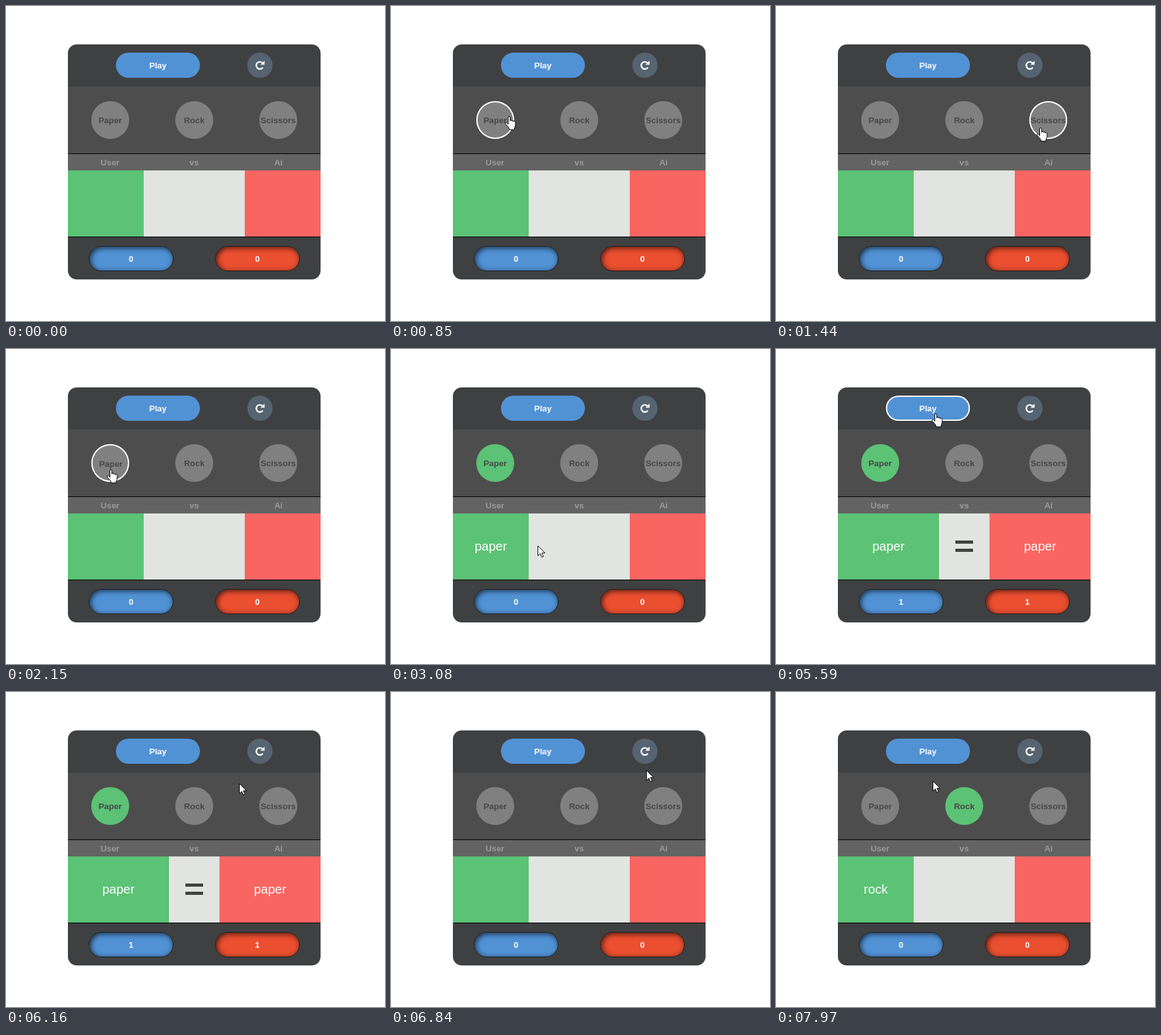
Animation, 600 px wide and 500 px high, one loop 8000 ms. Source, as an HTML page:

```html
<!DOCTYPE html>
<html lang="en">
<head>
<meta charset="utf-8">
<title>Paper Rock Scissors</title>
<style>
html, body { margin: 0; width: 100%; height: 100%; overflow: hidden; background: #fff; }
body { position: relative; font: bold 13.333px "Liberation Sans", Arial, sans-serif; }
div { box-sizing: border-box; }
.card { position: absolute; left: 98px; top: 61px; width: 400px; height: 373px; border-radius: 14px; overflow: hidden; background: #3f4042; }
.card div, .card svg { position: absolute; }
.btn, .score, .label, .side { display: flex; align-items: center; justify-content: center; }
.choices { top: 67px; width: 400px; height: 106px; background: #4d4d4d; }
.labels { top: 173px; width: 400px; height: 27px; border-top: 1px solid #000; background: #636363; color: #9a9a9a; }
.label { top: 0; width: 33.333%; height: 26px; }
.arena { top: 200px; width: 400px; height: 106px; border-bottom: 1px solid #000; background: #e1e4e1; }
.side { top: 0; width: 120px; height: 105px; color: #fff; font-size: 20px; font-weight: normal; }
.side.wide { width: 160px; }
#user { left: 0; background: #5cc275; }
#ai { right: 0; background: #f96561; }
#equal { left: 186px; top: 43px; width: 28px; height: 18px; border: solid #424242; border-width: 5px 0; visibility: hidden; }
.btn { border-radius: 30px; }
.btn.over { box-shadow: inset 0 0 0 2px #fff; }
.btn.down > * { transform: translate(1px, 1px); }
.pick { top: 90px; width: 60px; height: 60px; background: #808080; color: #474747; }
.pick.on { background: #5cc275; }
#play { left: 76px; top: 13px; width: 133px; height: 40px; background: #5192d5; color: #fff; }
#reset { left: 284px; top: 13px; width: 40px; height: 40px; background: #566370; }
#paper { left: 37px; }
#rock { left: 170px; }
#scissors { left: 303px; }
.score { top: 320px; width: 134px; height: 40px; border: 1px solid #1b1b1b; border-radius: 20px; color: #fff; box-shadow: inset 2px 2px 8px rgba(0, 0, 0, .7); }
#userScore { left: 33px; background: #5192d5; }
#aiScore { left: 233px; background: #ea4f30; }
#cursor { position: absolute; left: 0; top: 0; overflow: visible; visibility: hidden; }
#cursor path { fill: #fff; stroke: #000; stroke-linejoin: round; }
</style>
</head>
<body>
<div class="card">
  <div class="choices"></div>
  <div class="btn" id="play"><span>Play</span></div>
  <div class="btn" id="reset">
    <svg width="16" height="16" viewBox="0 0 16 16">
      <path d="M12.2 4.6A5.7 5.7 0 1 0 12.6 11.6" fill="none" stroke="#fff" stroke-width="2.4"/>
      <path d="M15.3 .8V7.2H8.9z" fill="#fff"/>
    </svg>
  </div>
  <div class="btn pick" id="paper"><span>Paper</span></div>
  <div class="btn pick" id="rock"><span>Rock</span></div>
  <div class="btn pick" id="scissors"><span>Scissors</span></div>
  <div class="labels">
    <div class="label" style="left:0">User</div>
    <div class="label" style="left:33.333%">vs</div>
    <div class="label" style="right:0">Ai</div>
  </div>
  <div class="arena">
    <div class="side" id="user"></div>
    <div id="equal"></div>
    <div class="side" id="ai"></div>
  </div>
  <div class="score" id="userScore">0</div>
  <div class="score" id="aiScore">0</div>
</div>
<svg id="cursor" width="20" height="24">
  <path id="arrow" d="M.5 .5V16.2L4.2 12.7L6.7 18.4L9.2 17.3L6.8 11.8H11.8z"/>
  <path id="hand" transform="translate(-6 0)" d="M5.5 12.7V2a1.5 1.5 0 0 1 3 0V7.5q0-1.5 1.5-1.5t1.5 1.5V8q0-1.2 1.4-1.2t1.4 1.2V9q0-1.2 1.3-1.2t1.4 1.4V14q0 2-1 3.5-.8 1.2-.8 4H7.5q0-2-1.5-4L1.5 12.5q-1-1.5 0-2.2 1.2-.7 2.4 .8z"/>
</svg>
<script>
const LOOP = 8000, PRESS = 100;
const $ = id => document.getElementById(id);

// Each button as a pill: centre, half length of its straight part, radius.
const buttons = [...document.querySelectorAll(".btn")].map(el => {
  const { left, top, width, height } = el.getBoundingClientRect();
  return { el, x: left + width / 2, y: top + height / 2, half: (width - height) / 2, r: height / 2 };
});
const on = Object.fromEntries(buttons.map(b => [b.el.id, [b.x, b.y + 10]]));

// Pointer glides; the pointer rests between them.
const glides = [
  { from: 360, to: 1160, via: [[205, 428], on.paper, on.rock] },
  { from: 1290, to: 2040, via: [on.rock, [418, 193], on.scissors, on.scissors, on.rock, on.paper] },
  { from: 2660, to: 4120, via: [on.paper, [190, 240], [232, 311], [262, 376], [268, 378], [280, 280], [284, 176], [254, 101]] },
  { from: 5590, to: 6350, via: [[252, 102], on.rock, [356, 158], on.reset] },
  { from: 6840, to: 7540, via: [[404, 124], on.scissors, on.rock] },
  { from: 7680, to: 7970, via: [on.rock, [286, 226], [248, 141]] }
];
const clicks = { paper: 2250, play: 4480, reset: 6640, rock: 7540 };

// Catmull-Rom curve through evenly timed points, u from 0 to 1.
function curve(points, u) {
  const last = points.length - 1;
  const i = Math.min(Math.floor(u * last), last - 1), f = u * last - i;
  const at = k => points[Math.max(0, Math.min(last, k))];
  return [0, 1].map(axis => {
    const [a, b, c, d] = [-1, 0, 1, 2].map(k => at(i + k)[axis]);
    return b + f / 2 * (c - a + f * (2 * a - 5 * b + 4 * c - d + f * (3 * (b - c) + d - a)));
  });
}

function pointer(t) {
  const glide = glides.findLast(g => t >= g.from);
  return glide && curve(glide.via, Math.min(1, (t - glide.from) / (glide.to - glide.from)));
}

function setText(id, text) {
  const el = $(id);
  if (el.textContent !== text) el.textContent = text;
}

function drawPointer(t) {
  const spot = pointer(t), [x, y] = spot || [-99, -99];
  let hover = false;
  for (const b of buttons) {
    const over = Math.hypot(Math.max(0, Math.abs(x - b.x) - b.half), y - b.y) <= b.r;
    const click = clicks[b.el.id];
    hover ||= over;
    b.el.classList.toggle("over", over);
    b.el.classList.toggle("down", t >= click - PRESS && t < click);
  }
  $("cursor").style.visibility = spot ? "visible" : "hidden";
  $("cursor").style.transform = `translate(${Math.round(x)}px, ${Math.round(y)}px)`;
  $("hand").style.display = hover ? "" : "none";
  $("arrow").style.display = hover ? "none" : "";
}

function drawGame(t) {
  const open = t < clicks.reset;
  const paper = open && t >= clicks.paper;
  const played = open && t >= clicks.play;
  const rock = t >= clicks.rock;
  $("paper").classList.toggle("on", paper);
  $("rock").classList.toggle("on", rock);
  setText("user", paper ? "paper" : rock ? "rock" : "");
  setText("ai", played ? "paper" : "");
  for (const id of ["user", "ai"]) {
    $(id).classList.toggle("wide", played);
    setText(id + "Score", played ? "1" : "0");
  }
  $("equal").style.visibility = played ? "visible" : "hidden";
}

let start;
function tick(now) {
  start ??= now;
  const t = (now - start) % LOOP;
  drawPointer(t);
  drawGame(t);
  requestAnimationFrame(tick);
}
requestAnimationFrame(tick);
</script>
</body>
</html>
```
